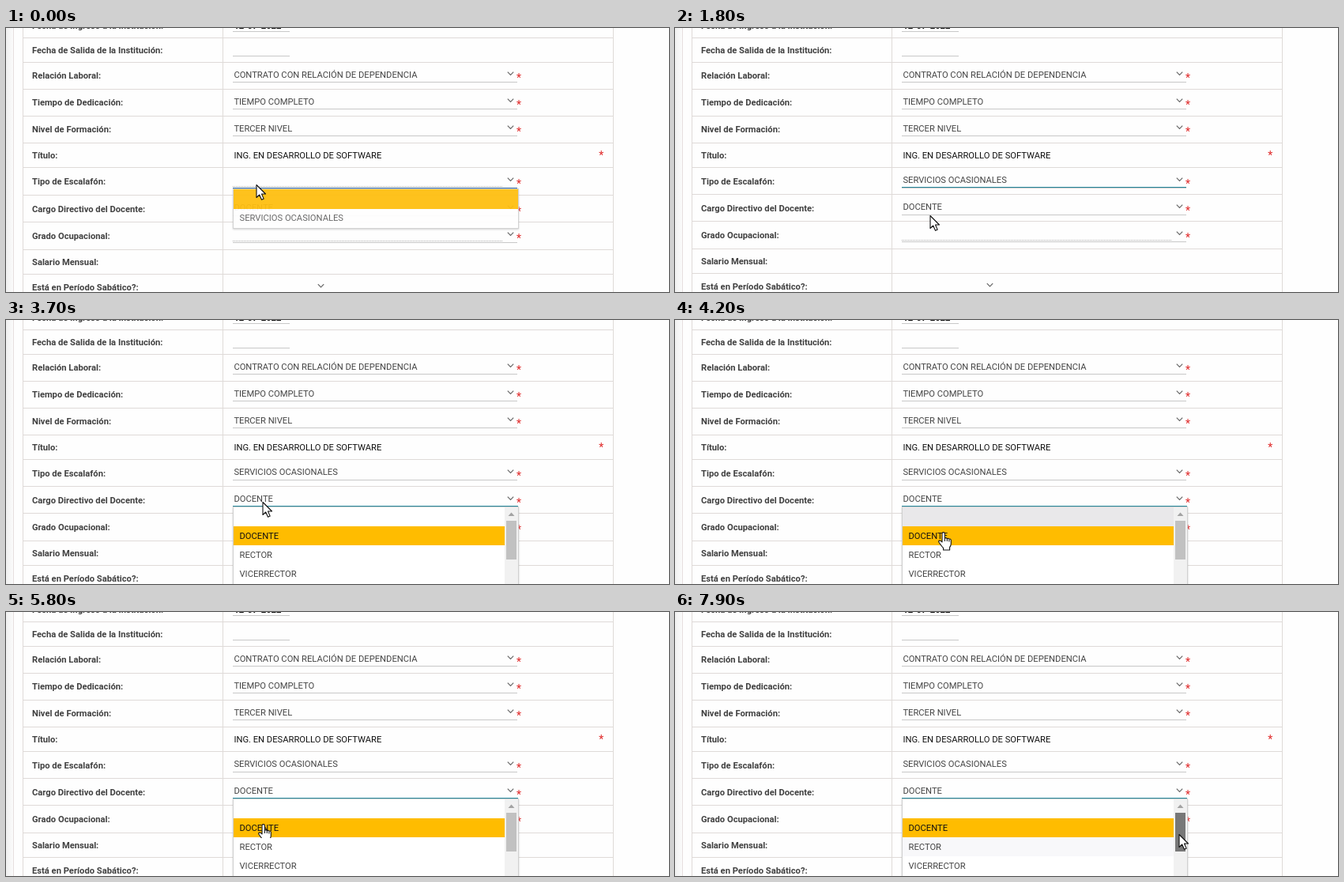
Animation, 839 px wide and 334 px high, one loop 8 s. Source, as an HTML page:

```html
<!DOCTYPE html>
<html lang="es">
<head>
<meta charset="utf-8">
<title>Formulario</title>
<style>
  html, body { margin: 0; width: 100%; height: 100%; overflow: hidden; background: #fefefe; }
  svg { display: block; width: 839px; height: 334px; }
  text { font: 11.2px Roboto, Arial, sans-serif; fill: #444; }
  .label { font-weight: 700; fill: #404040; }
  .dark { fill: #111; }
  .soft { fill: #606060; }
  .star { font-size: 14px; fill: #e02a2a; }
  .grid { stroke: #dfdad8; }
  .rule { stroke: #c8c8c8; }
  .dots { stroke: #aaa; stroke-dasharray: 1 1; }
  .focus { stroke: #23869a; }
  .chev { fill: none; stroke: #666; stroke-width: 1.2; }
  .panel { fill: #fff; stroke: #d0d0d0; filter: drop-shadow(0 1px 1px rgba(0,0,0,.18)); }
  .cursor { fill: #fff; stroke: #111; stroke-width: 1.1; stroke-linejoin: round; }
</style>
</head>
<body>
<svg id="stage" viewBox="0 0 839 334">
  <defs>
    <linearGradient id="edge">
      <stop offset="0" stop-color="#f0f0f0"/><stop offset="1" stop-color="#fbfbfb"/>
    </linearGradient>
    <clipPath id="stillClip"><rect x="315" y="266" width="24" height="20"/></clipPath>
    <path id="hand" class="cursor" d="M5 13V2.3a1.7 1.7 0 0 1 3.4 0V8.2q1.6-1.2 2.9.5 1.5-1 2.6.6 2-.8 2.4 1.2V15q0 2.4-1.7 4.600V23H6.600V20.500Q4.500 18.500 1 13.300q-.9-2 .9-2.300Q3.600 11 5 13ZM8.400 8.500V12M11.300 9V12M13.900 10V12.500"/>
  </defs>
  <rect width="9" height="334" fill="url(#edge)"/>
  <path d="M9.500 0V334" stroke="#e6dfdf"/>
  <g id="top"></g>
  <g id="middle"></g>
  <g id="bottom"></g>
  <path class="grid" d="M21.500 0V334M274.500 0V334M768.500 0V334"/>
  <path id="tipoFocus" class="focus"/>
  <g id="smallPanel"></g>
  <g id="bigPanel"></g>
  <g id="still" clip-path="url(#stillClip)"><use href="#hand" x="319" y="268"/></g>
  <use id="handPointer" href="#hand"/>
  <path id="arrow" class="cursor" d="M.5 .5V16.500L4.200 13 7 19.300 9.700 18.100 7 12H12Z"/>
</svg>
<script>
const $ = id => document.getElementById(id);
const LOOP = 8000, STEP = 100;

const text = (x, y, s, cls = "") => `<text x="${x}" y="${y}" class="${cls}">${s}</text>`;
const line = (x1, x2, y, cls) => `<path class="${cls}" d="M${x1} ${y + .5}H${x2}"/>`;
const rect = (x, y, w, h, fill, id = "") =>
  `<rect id="${id}" x="${x}" y="${y}" width="${w}" height="${h}" fill="${fill}"/>`;
const label = (y, s) => text(33, y + 4, s, "label");
const value = (y, s, cls) => text(288.4, y + 4, s, cls);
const star = (x, y) => text(x, y + 5.5, "*", "star");
const chevron = (x, y) => `<path class="chev" d="M${x - 3.7} ${y - 1.8}l3.700 3.700 3.700-3.700"/>`;
const border = y => line(21, 769, y, "grid");
// A select box placed by its underline.
const select = y => chevron(638.5, y - 10.5) + star(646, y - 6) + line(287, 647, y, "rule");
const emptyDots = y => line(287, 628, y, "dots");

$("top").innerHTML =
  label(-3, "Fecha de Ingreso a la Institución:") + value(-3, "12-07-2022", "label dark") +
  line(287, 359, 4, "rule") + border(12) +
  label(28, "Fecha de Salida de la Institución:") + line(287, 359, 35, "rule") + border(43) +
  label(60, "Relación Laboral:") + value(59, "CONTRATO CON RELACIÓN DE DEPENDENCIA") + select(68) + border(77) +
  label(94, "Tiempo de Dedicación:") + value(93, "TIEMPO COMPLETO") + select(102) + border(111) +
  label(128, "Nivel de Formación:") + value(127, "TERCER NIVEL") + select(136) + border(145) +
  label(161, "Título:") + value(161, "ING. EN DESARROLLO DE SOFTWARE", "dark") + star(750.3, 160) + border(176) +
  label(194, "Tipo de Escalafón:") + select(202) +
  `<g id="tipoEmpty">${emptyDots(200)}</g>` +
  `<g id="tipoValue">${value(192, "SERVICIOS OCASIONALES")}</g>`;

$("middle").innerHTML =
  border(210) + label(228, "Cargo Directivo del Docente:") + value(226, "DOCENTE") + select(236) +
  border(244) + label(262, "Grado Ocupacional:") + emptyDots(268) + select(270) +
  border(279) + label(295, "Salario Mensual:");

$("bottom").innerHTML =
  border(310) + label(327, "Está en Período Sabático?:") + chevron(398.5, 325);

$("smallPanel").innerHTML =
  '<rect class="panel" x="287.5" y="203.500" width="361" height="50"/>' +
  rect(288, 204, 360, 25, "#ffbf10") + text(295.5, 244, "SERVICIOS OCASIONALES", "soft");

const options = ["", "DOCENTE", "RECTOR", "VICERRECTOR"];
const optionTop = i => 237 + 24 * i;
$("bigPanel").innerHTML =
  '<rect class="panel" x="287.5" y="236.5" width="361" height="110"/>' +
  options.map((s, i) =>
    rect(288, optionTop(i), 343, 24, i === 1 ? "#ffbc00" : "#fff", "option" + i) +
    text(295.5, optionTop(i) + 16, s, i === 1 ? "dark" : "")).join("") +
  rect(631, 237, 17, 97, "#f1f1f1") + rect(633, 254, 13, 49, "#c1c1c1", "thumb") +
  '<path d="M635.500 248l4-4.500 4 4.500z" fill="#a3a3a3"/>' +
  line(287, 648, 235, "focus");

// Pointer route as [ms, x, y].
const route = [
  [0, 316, 198], [400, 316, 198], [600, 319, 228], [700, 321, 241], [800, 322, 237],
  [2000, 322, 237], [2200, 268, 290], [2300, 220, 306], [2400, 182, 285], [2500, 165, 250],
  [2600, 180, 226], [2700, 180, 226], [2800, 201, 225], [3100, 304, 232], [3200, 304, 232],
  [3400, 322, 226], [3700, 324, 230], [3900, 332, 252], [4200, 333, 268], [4500, 333, 268],
  [4800, 319, 268], [5000, 319, 268], [5200, 307, 305], [5500, 302, 340],
  [7200, 520, 340], [7400, 560, 316], [7600, 610, 294], [7800, 637, 280], [7900, 637, 281]
];

function along(t) {
  const i = route.findIndex(p => p[0] > t);
  if (i < 0) return route[route.length - 1].slice(1);
  const [t0, x0, y0] = route[i - 1], [t1, x1, y1] = route[i];
  const k = (t - t0) / (t1 - t0);
  return [x0 + (x1 - x0) * k, y0 + (y1 - y0) * k];
}

const clamp = v => Math.max(0, Math.min(1, v));
const show = (id, on) => $(id).setAttribute("display", on ? "inline" : "none");
const move = (id, x, y) => $(id).setAttribute("transform", `translate(${x} ${y})`);

function render(t) {
  const chosen = t >= 100;
  move("middle", 0, chosen ? 0 : 1);
  move("bottom", 0, t < 1000 ? 1 : 0);
  show("tipoValue", chosen);
  show("tipoEmpty", !chosen);
  $("smallPanel").setAttribute("opacity", t < 100 ? .94 : t < 200 ? .45 : 0);

  // The focus rule regrows from its centre once the field is refreshed.
  const grow = t < 500 || t >= 1100 ? 1 : .944 * (1 - (1 - clamp((t - 500) / 300)) ** 2);
  const half = 180 * grow;
  show("tipoFocus", t < 3400 && half > 0);
  $("tipoFocus").setAttribute("d", `M${467 - half} ${chosen ? 201.5 : 202.5}H${467 + half}`);
  $("tipoFocus").style.stroke = chosen ? "" : "#3569a0";

  const open = clamp((t - 3400) / 300);
  $("bigPanel").setAttribute("opacity", open);

  const [x, y] = along(t).map(Math.round);
  const inPanel = open === 1 && y > 236;
  const onBar = inPanel && x >= 631;
  const hovered = inPanel && !onBar ? Math.floor((y - 237) / 24) : -1;
  const leaving = t >= 5200 && t < 5500;
  [0, 2, 3].forEach(i => {
    const lit = i === 0 ? t >= 3800 && t < 4300 : i === hovered || (i === 3 && leaving);
    const soft = i === 2 && (t >= 7600 || leaving);
    $("option" + i).setAttribute("fill", soft ? "#f8f8fa" : lit ? "#e9e8ea" : "#fff");
  });
  $("thumb").setAttribute("fill", onBar ? "#787878" : "#c1c1c1");

  const useHand = inPanel && !onBar;
  show("handPointer", useHand);
  show("arrow", !useHand);
  move("handPointer", x, y);
  move("arrow", x + .5, y);
  show("still", t >= 5100 && t < 7400);
}

function tick(now) {
  render(Math.floor(now % LOOP / STEP) * STEP);
  requestAnimationFrame(tick);
}
render(0);
requestAnimationFrame(tick);
</script>
</body>
</html>
```
